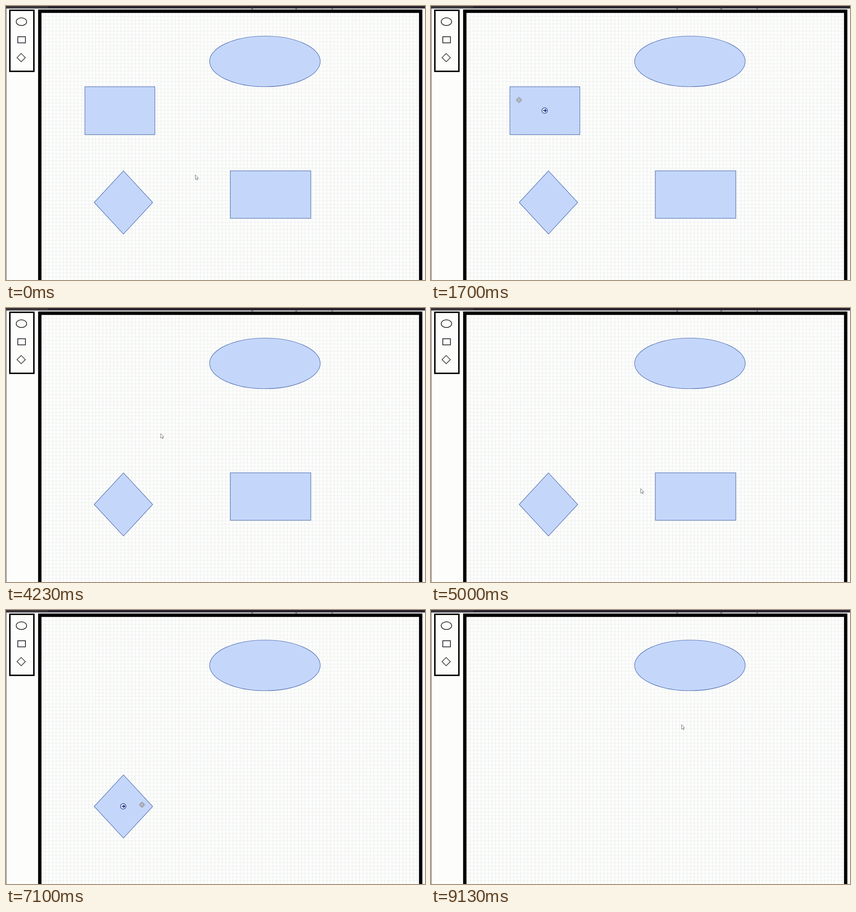
An HTML page for the animation above (9.16 s loop, 924 by 606 pixels).

```html
<!DOCTYPE html>
<html lang="en">
<head>
<meta charset="utf-8">
<title>Shape editor</title>
<style>
  html, body { margin: 0; width: 100%; height: 100%; overflow: hidden; background: #fdfdfb; }
  svg { display: block; }
  .shape { fill: #c4d7fb; stroke: #5873b4; stroke-width: 1.2; }
  .handle { fill: #2fe02f; stroke: #124a12; }
</style>
</head>
<body>
<svg width="924" height="606" viewBox="0 0 924 606">
  <rect width="924" height="606" fill="#fdfdfc"/>
  <rect width="924" height="5.5" fill="#2b2532"/>
  <rect width="93" height="5.5" fill="#39363b"/>
  <path d="M0 5.5H924" stroke="#8a868e"/>
  <path d="M541 6.5h4M638 6.5h4M718 6.5h3" stroke="#55515a"/>
  <path d="M0.5 5V606" stroke="#55555a"/>

  <path id="columns" stroke="#e5e8f3" stroke-dasharray="3 1"/>
  <path id="rows" stroke="#e8efe0" stroke-dasharray="3 1"/>
  <path d="M74.5 606V11.5H914.5V606" fill="none" stroke="#000" stroke-width="7.4"/>

  <rect x="8.5" y="9.5" width="53" height="135" fill="#fdfdfc" stroke="#000" stroke-width="3.2"/>
  <g id="tools" fill="none" stroke-width="1.7">
    <ellipse cx="34" cy="34.7" rx="11.5" ry="8.5" stroke="#303030"/>
    <rect x="26" y="68" width="16.8" height="13.5" stroke="#24242c"/>
    <path d="M33.5 105l9.2 9.2-9.2 9.2-9.2-9.2z" stroke="#4c4c4c"/>
  </g>

  <g id="shapes">
    <ellipse class="shape" cx="571" cy="122.5" rx="122" ry="56"/>
  </g>

  <g id="frame">
    <rect id="outline" fill="none" stroke="#00f000" stroke-opacity="0.55" stroke-dasharray="3 3"/>
    <g id="handles"></g>
  </g>
  <g id="link">
    <circle r="6" fill="#fff" stroke="#2f469f" stroke-width="1.4"/>
    <path d="M-3.5 0H3M0.3-3L3.3 0 0.3 3" fill="none" stroke="#1c2a78" stroke-width="2"/>
  </g>
  <path id="arrow" d="M0.5 0.5V10.5L2.8 8.4 4.4 12 6 11.3 4.4 7.8H7.5z"
        fill="#fff" stroke="#666" stroke-width="0.9"/>
  <path id="move" d="M0-6.5L2.5-4H1V-1H4V-2.5L6.5 0 4 2.5V1H1V4H2.5L0 6.5-2.5 4H-1V1H-4V2.5L-6.5 0-4-2.5V-1H-1V-4H-2.5z"
        fill="#fff" stroke="#555" stroke-width="0.9"/>
</svg>
<script>
const LOOP = 9160;
const $ = id => document.getElementById(id);

// Each shape: bounds, then the times it is selected and deleted
const items = [
  { kind: "rect", x: 174, y: 178.5, w: 154.3, h: 106, pick: 2550, gone: 3790 },
  { kind: "rect", x: 494.7, y: 364.5, w: 177.5, h: 105, pick: 5440, gone: 6050 },
  { kind: "rhombus", x: 194.5, y: 364.7, w: 129, h: 139.6, pick: 7330, gone: 8320 }
];

// Pointer hotspot: time, x, y
const track = [
  [0, 417, 373], [250, 412, 368], [1350, 205, 217], [1700, 194, 208],
  [2000, 198, 207], [2550, 255, 204], [3000, 262, 202], [3850, 262, 202],
  [4630, 425, 358], [5000, 462, 399], [5400, 540, 402], [6300, 540, 398],
  [6480, 530, 400], [7250, 275, 434], [7970, 277, 432], [8400, 278, 431],
  [9060, 552, 253], [LOOP, 552, 253]
];

function make(tag, attrs, parent) {
  const el = document.createElementNS("http://www.w3.org/2000/svg", tag);
  for (const key in attrs) el.setAttribute(key, attrs[key]);
  return parent.appendChild(el);
}

const snap = v => Math.round(v - 0.5) + 0.5;

// The grid pitch is slightly under 8 px; lines sit on whole pixels
function ruled(from, to, pitch, line) {
  let d = "";
  for (let v = from; v < to; v += pitch) d += line(snap(v));
  return d;
}
$("columns").setAttribute("d", ruled(78.5, 911, 7.965, x => `M${x} 15V606`));
$("rows").setAttribute("d", ruled(15.5, 606, 7.98, y => `M78 ${y}H911`));

for (const it of items) {
  const { x, y, w, h } = it;
  it.el = it.kind === "rect"
    ? make("rect", { class: "shape", x, y, width: w, height: h }, $("shapes"))
    : make("path", {
        class: "shape",
        d: `M${x + w / 2} ${y}l${w / 2} ${h / 2} ${-w / 2} ${h / 2} ${-w / 2} ${-h / 2}z`
      }, $("shapes"));
}

const spots = [];
for (const v of [0, 0.5, 1])
  for (const u of [0, 0.5, 1])
    if (u !== 0.5 || v !== 0.5)
      spots.push({ u, v, el: make("rect", { class: "handle", width: 5, height: 5 }, $("handles")) });

function show(el, on) {
  el.setAttribute("visibility", on ? "visible" : "hidden");
}

function place(el, x, y) {
  el.setAttribute("transform", `translate(${x} ${y})`);
}

function pointerAt(t) {
  const i = Math.max(1, track.findIndex(p => p[0] > t));
  const [t0, x0, y0] = track[i - 1], [t1, x1, y1] = track[i];
  const k = (t - t0) / (t1 - t0), e = k * k * (3 - 2 * k);
  return [x0 + (x1 - x0) * e, y0 + (y1 - y0) * e];
}

function hits(it, px, py) {
  const dx = Math.abs(px - it.x - it.w / 2) / (it.w / 2);
  const dy = Math.abs(py - it.y - it.h / 2) / (it.h / 2);
  return it.kind === "rect" ? dx < 1 && dy < 1 : dx + dy < 1;
}

function drawFrame(it) {
  const { x, y, w, h } = it;
  const box = { x: snap(x), y: snap(y), width: Math.round(w), height: Math.round(h) };
  for (const key in box) $("outline").setAttribute(key, box[key]);
  for (const s of spots) place(s.el, snap(x + s.u * w - 2.5), snap(y + s.v * h - 2.5));
}

function draw(t) {
  const [px, py] = pointerAt(t);
  const live = items.filter(it => t < it.gone);
  const over = live.find(it => hits(it, px, py));
  const chosen = live.find(it => t >= it.pick);

  for (const it of items) show(it.el, t < it.gone);
  $("tools").setAttribute("opacity", chosen ? 0.24 : 1);

  show($("frame"), chosen);
  if (chosen) drawFrame(chosen);

  show($("link"), over);
  if (over) place($("link"), over.x + over.w / 2 - 0.5, over.y + over.h / 2 - 0.3);

  show($("arrow"), !over);
  show($("move"), over);
  place($("arrow"), px, py);
  place($("move"), px, py);
}

const start = performance.now();
function tick() {
  draw((performance.now() - start) % LOOP);
  requestAnimationFrame(tick);
}
tick();
</script>
</body>
</html>
```
